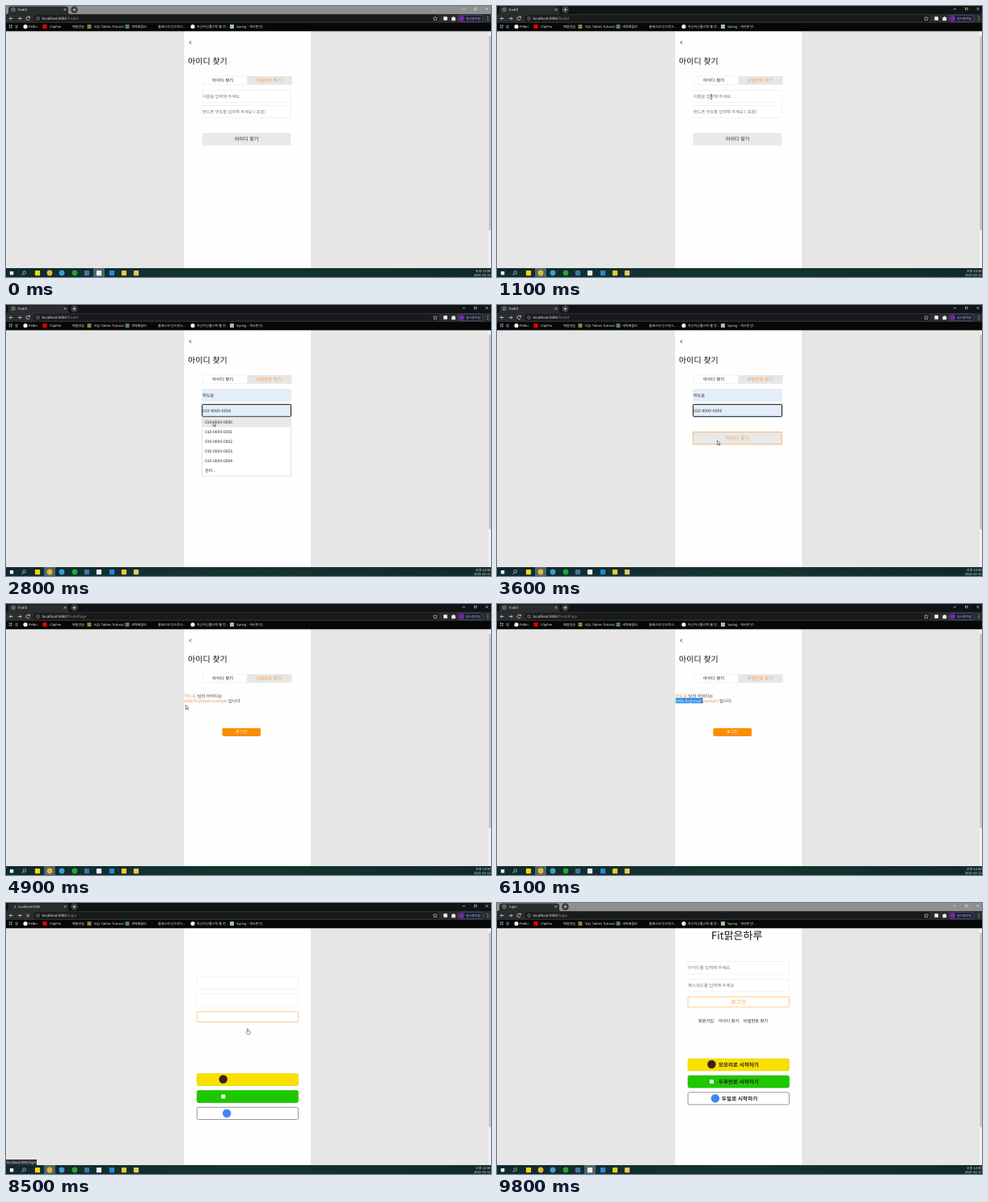
Write an HTML page that moves like this. It is 600 px wide and 336 px high and loops after 9.9 s.

```html
<!DOCTYPE html>
<html lang="ko">
<head>
<meta charset="utf-8">
<title>아이디 찾기</title>
<style>
  html, body { margin: 0; width: 600px; height: 336px; overflow: hidden; background: #e6e6e6; }
  svg { display: block; }
  text {
    font-family: "Noto Sans CJK KR", "Noto Sans CJK JP", "Noto Sans CJK", "Noto Sans", sans-serif;
    text-rendering: geometricPrecision;
    white-space: pre;
  }
</style>
</head>
<body>
<svg id="stage" width="600" height="336" viewBox="0 0 600 336"></svg>
<script>
const LOOP = 9900, STEP = 100;
const ORANGE = '#ff9a3c', INK = '#222', HINT = '#777', FILLED = '#e4eefb', SKY = '#87ceeb';
const PERSON = '하도윤', PHONE = '010-0000-0000', MAIL = 'little.fir@mail.example';

const text = (x, y, s, size, fill = INK, more = '') =>
  `<text x="${x}" y="${y}" font-size="${size}" fill="${fill}" ${more}>${s}</text>`;
const rect = (x, y, w, h, fill, more = '') =>
  `<rect x="${x}" y="${y}" width="${w}" height="${h}" fill="${fill}" ${more}/>`;
const dot = (x, y, r, fill, more = '') => `<circle cx="${x}" cy="${y}" r="${r}" fill="${fill}" ${more}/>`;
const line = (d, color, w = 0.7, more = '') =>
  `<path d="${d}" fill="none" stroke="${color}" stroke-width="${w}" ${more}/>`;
const group = (id, body, more = '') => `<g id="${id}" ${more}>${body}</g>`;
const edge = (color, w = 0.6) => `stroke="${color}" stroke-width="${w}"`;

function browser() {
  const pale = '#e8eaed';
  const marks = [
    [28, 'Pelbri', 24, '#f4f4f4', 'o'], [54, 'ClipFen', 48, '#f00000', 's'], [82, '매일연습'],
    [109, 'SQL Tables Tutorial', 103, '#9a7b3c', 's'], [155, '새싹배움터', 150, '#4c7f78', 's'],
    [188, '클래스와 인스턴스...'], [236, '차근차근풀스택 웹 전...', 231, '#f0f0f0', 'o'],
    [285, 'Spring - 게시판 만...', 279.5, '#9fc39a', 's']
  ].map(([x, s, ix, c, kind]) =>
    (kind === 'o' ? dot(ix, 25.5, 2.6, c) : kind ? rect(ix - 2.5, 23, 5, 5, c) : '') +
    text(x, 27, s, 4.05, pale)).join('');

  return rect(0, 0, 600, 10, '#121314', 'id="strip"') +
    `<path d="M1 10Q3 10 3 7V3Q3 0.5 6 0.5H74Q77 0.5 77 3V7Q77 10 79 10Z" fill="#2b2c2e"/>` +
    group('globe', dot(9, 4.5, 2.4, '#55585b', edge('#8b8e91'))) +
    group('spinner', line('M9 2.1A2.4 2.4 0 0 1 11.4 4.5', '#bdc1c6', 0.8)) +
    text(15, 6, '', 4, pale, 'id="title"') +
    line('M71.7 3.2l2.6 2.6m0-2.6l-2.6 2.6', pale, 0.6) +
    dot(84.5, 4.6, 4.3, '#3a3b3e') + line('M82.6 4.6h3.8m-1.9-1.9v3.8', pale, 0.7) +
    line('M564.5 3.8h3.5M593.3 2l3.2 3.2m0-3.2l-3.2 3.2', pale, 0.6) +
    rect(579.5, 2.3, 2.6, 2.6, 'none', edge(pale, 0.5)) +
    rect(0, 10, 600, 11, '#2b2c2e') + rect(34, 11.2, 502, 8.4, '#191a1c', 'rx="4.2"') +
    line('M8.5 15.5H4.2m2-2l-2 2 2 2', pale) + line('M14.7 15.5H19m-2-2l2 2-2 2', pale) +
    group('reload', line('M29 14.2A2.2 2.2 0 1 0 29.2 16.2M29.4 12.8v1.7h-1.7', pale)) +
    group('stop', line('M25.2 13.6l3.8 3.8m0-3.8l-3.8 3.8', pale)) +
    dot(39.5, 15.5, 2, 'none', edge('#a9adb1', 0.5)) + line('M39.5 15v1.6m0-2.3v.4', '#a9adb1', 0.5) +
    text(44.5, 17.2, '<tspan fill="#f1f3f4">localhost:8080</tspan><tspan id="path"/>', 4.5, '#8d9195') +
    line('M531 13l.8 1.7 1.8.2-1.3 1.2.3 1.8-1.6-.9-1.6.9.3-1.8-1.3-1.2 1.8-.2Z', pale, 0.5) +
    rect(541.3, 13.2, 4.6, 4.6, '#f4f4f4', 'rx=".6"') +
    `<path d="M551.3 14h1.5a.9.9 0 0 1 1.8 0h1.2v1.4a.9.9 0 0 1 0 1.6v1.3h-4.5Z" fill="${pale}"/>` +
    rect(559, 11.3, 31, 8.3, '#1d1d2c', 'rx="4.1" ' + edge('#6b70b5', 0.5)) +
    dot(563.6, 15.5, 3.3, '#7329a5') + text(569, 17, '일시중지됨', 3.9, '#a9c4f5') +
    [13.3, 15.5, 17.7].map(y => dot(596, y, 0.55, pale)).join('') +
    rect(0, 21, 600, 10.3, '#070707') +
    [3.8, 6.1].map(x => [23.4, 25.8].map(y => rect(x, y, 1.5, 1.5, '#8ab4f8')).join('')).join('') +
    text(11, 27, '앱', 4.05, pale) + marks;
}

function taskbar() {
  const icons = [[39, '#f7d800', 's'], [54, '#e5b53a', 'o'], [69, '#3c9fd0', 'o'], [85, '#25a52e', 'o'],
    [100, '#3f789b', 's'], [115, '#eeeeee', 's'], [131, '#2389d4', 's'], [146, '#f6c928', 's'], [161, '#efc65c', 's']];
  return rect(0, 325, 600, 11, 'url(#bar)') +
    rect(0, 325, 14, 11, '#4f6666', 'id="active"') +
    rect(4.8, 329, 4.4, 4.4, '#eef2f3') +
    dot(22.7, 330.5, 1.8, 'none', edge('#eee', 0.6)) + line('M21.4 331.9l-1.9 1.9', '#eee') +
    icons.map(([x, c, k]) => k === 'o' ? dot(x, 331, 3.4, c) : rect(x - 3.1, 328, 6.2, 6.2, c, 'rx=".7"')).join('') +
    text(599.5, 330, '오후 12:30', 4, '#f0f0f0', 'text-anchor="end"') +
    text(599.5, 335, '2021-02-11', 4, '#f0f0f0', 'text-anchor="end"');
}

const finder = () =>
  line('M229.3 43.6l-2.6 1.7 2.6 1.7', INK, 0.7) +
  text(225, 72.2, '아이디 찾기', 10, '#111') +
  rect(243.5, 87, 55, 10.6, '#fff', edge('#ebebeb')) + rect(298.5, 87, 55, 10.6, '#e6e6e6') +
  text(255, 94.1, '아이디 찾기', 5.4) + text(309.7, 94.1, '비밀번호 찾기', 5.4, ORANGE);

const field = (id, y) =>
  rect(242.7, y, 109.8, 15, '#fff', `id="${id}Box"`) + text(243, y + 9.6, '', 5.2, HINT, `id="${id}Text"`);

function list(id, y, items) {
  const h = 12;
  return group(id, rect(242.5, y, 110, items.length * h + 1, '#fff', edge('#c8c8c8', 0.5)) +
    rect(242.8, y + 0.5, 109.4, h, '#e8e8e8', `id="${id}Hover"`) +
    items.map((s, i) => text(246, y + 8.3 + i * h, s, 5)).join(''));
}

const form = () => field('name', 104.3) + field('phone', 123.3) +
  rect(242.7, 157.4, 109.6, 15.4, '#e9e9e9', 'id="findBox"') +
  text(283, 167.4, '아이디 찾기', 6, INK, 'id="findText"') +
  list('nameList', 120, [PERSON, '관리...']) +
  list('phoneList', 139, [PHONE, ...[1, 2, 3, 4].map(n => '010-0000-000' + n), '관리...']);

const result = () =>
  text(220.5, 115.6, `<tspan fill="#f0905a">${PERSON}</tspan> 님의 아이디는`, 5.3, '#333') +
  text(220.7, 121.8, MAIL, 5, '#f0905a') + text(275, 121.8, '입니다', 5.25, '#333') +
  `<g clip-path="url(#picked)">${rect(220.5, 116.5, 54, 6.6, '#2f8ae6')}${text(220.7, 121.8, MAIL, 5, '#fff')}</g>` +
  rect(267.7, 154, 47.2, 9.8, '#d97400', 'rx="1.6"') + rect(267.7, 154, 47.2, 9, '#ff8c00', 'rx="1.6"') +
  text(284, 160.3, '로그인', 5.2, '#fff');

function login() {
  const box = (y, h, fill, stroke, more = '') => rect(236.2, y, 125.3, h, fill, edge(stroke) + more);
  return box(72.5, 15.5, '#fff', '#ececec') + box(94.3, 15.5, '#fff', '#ececec') +
    box(116.3, 12.6, '#fff', '#ffac4d', ' rx=".8"') +
    box(193, 15, '#f9e000', '#e8d100', ' rx="2"') + box(214, 15, '#1ec800', '#19b300', ' rx="2"') +
    box(234.8, 15.2, '#fff', '#555', ' rx="2"') +
    group('badges', dot(265.5, 200, 5.2, '#3a2020') + rect(263.2, 219, 4.8, 4.8, '#fff') +
      dot(270, 242.3, 5.2, '#4285f4')) +
    group('words', text(265, 45.2, 'Fit맑은하루', 13, '#111', 'font-weight="500"') +
      text(236.3, 82, '아이디를 입력해 주세요.', 5.3, HINT) +
      text(236.3, 103.8, '패스워드를 입력해 주세요', 5.35, HINT) +
      text(289.6, 125, '로그인', 6.7, ORANGE) +
      text(249, 147.8, '회원가입', 5.2) + text(274, 147.8, '아이디 찾기', 5.2) + text(305, 147.8, '비밀번호 찾기', 5.2) +
      text(274, 203, '모모리로 시작하기', 6.5, '#222', 'font-weight="700"') +
      text(274, 224, '두루빈로 시작하기', 6.5, '#222', 'font-weight="700"') +
      text(278, 245, '두빌로 시작하기', 6.6, '#222', 'font-weight="700"'));
}

const cursors = () =>
  group('arrow', '<path d="M0 0V5.3L1.2 4.2 2.1 6.1 3 5.7 2.1 3.9H3.8Z" fill="#fff" stroke="#111" stroke-width=".5"/>') +
  group('beam', line('M-1.2-2.8H1.2M0-2.8V2.8M-1.2 2.8H1.2', '#333', 0.6)) +
  group('hand', '<path d="M0 0Q.8-.5 1 .3V2.4Q3.9 2.5 3.9 3.8V5L3.2 6.8H.2L-1.6 4Q-1.4 3-.2 4Z" fill="#fff" stroke="#222" stroke-width=".5"/>');

document.getElementById('stage').innerHTML =
  `<defs><linearGradient id="bar"><stop stop-color="#0f2930"/><stop offset=".5" stop-color="#14352f"/>
  <stop offset="1" stop-color="#0f292b"/></linearGradient>
  <clipPath id="picked"><rect id="pick" x="220.5" y="116" height="8" width="0"/></clipPath></defs>` +
  rect(0, 31, 600, 294, '#e6e6e6') + rect(220.3, 31, 156.8, 294, '#fefefe') +
  rect(597, 31, 3, 294, '#f1f1f1') + rect(597.6, 37, 2, 241, '#b9b9b9') +
  group('finder', finder() + group('form', form()) + group('result', result())) +
  group('login', login()) + browser() +
  group('status', rect(0, 318, 38, 7, '#2f3235') + text(1, 323.2, 'localhost:8080/login', 3.9, '#d5d8db')) +
  taskbar() + cursors();

const el = {};
document.querySelectorAll('[id]').forEach(e => { el[e.id] = e; });
const show = (id, on) => el[id].setAttribute('display', on ? 'inline' : 'none');
const set = (id, attrs) => Object.entries(attrs).forEach(([k, v]) => el[id].setAttribute(k, v));

// time, x, y of the pointer
const route = [[400, 330, 324], [1000, 268, 113], [1200, 262, 112], [1500, 262, 112], [1700, 262, 126],
  [2000, 262, 126], [2200, 254, 129.5], [2500, 254, 129.5], [2700, 256, 145], [3200, 256, 145],
  [3600, 272.5, 168], [3900, 279, 167], [4500, 279, 167], [4900, 222.3, 125.2], [5300, 221, 119.6],
  [5400, 221, 119.6], [6400, 268, 119.6], [7000, 274, 119.6], [7100, 274, 119.6], [7400, 296.3, 169],
  [7500, 296.3, 169], [8000, 298.4, 156], [8600, 298.4, 156], [9100, 449, 337]];

function along(t) {
  const i = route.findIndex(k => k[0] > t);
  if (i < 0) return route[route.length - 1].slice(1);
  if (!i) return route[0].slice(1);
  const [a, b] = [route[i - 1], route[i]], p = (t - a[0]) / (b[0] - a[0]);
  return [a[1] + (b[1] - a[1]) * p, a[2] + (b[2] - a[2]) * p];
}

function fill(id, value, hint, focused) {
  el[id + 'Text'].textContent = value || hint;
  set(id + 'Text', { fill: value ? INK : HINT });
  set(id + 'Box', {
    fill: value ? FILLED : focused ? SKY : '#fff',
    stroke: focused ? '#111' : '#ececec', 'stroke-width': focused ? 1 : 0.6, rx: focused ? 0.8 : 0
  });
}

function draw(time) {
  const t = Math.floor(time / STEP) * STEP;
  const within = (a, b) => t >= a && t < b;
  const awake = within(400, 9800), loading = within(3900, 4600) || within(8200, 8700);
  const atLogin = t >= 8400, ready = t >= 8700;

  set('strip', { fill: awake ? '#121314' : '#8f8f8f' });
  set('active', { x: awake ? 47 : 108 });
  el.title.textContent = ready ? 'login' : atLogin ? 'localhost:8080' : 'findID';
  el.path.textContent = atLogin ? '/login' : t >= 4600 ? '/findIdPage' : '/findId';
  show('globe', !loading);
  show('spinner', loading);
  show('reload', !loading);
  show('stop', loading);
  set('spinner', { transform: `rotate(${(Math.min(t, t < 4600 ? 4200 : t) * 0.45 + 180) % 360} 9 4.5)` });

  show('finder', !atLogin);
  show('form', t < 4600);
  show('result', t >= 4600);
  show('login', atLogin);
  show('words', ready);
  set('login', { transform: `translate(0 ${ready ? 0 : 18.5})` });
  set('badges', { transform: `translate(${ready ? 0 : 3.2} 0)` });
  show('status', within(7700, 9000));

  fill('name', t >= 1800 ? PERSON : '', '이름을 입력해 주세요.', within(1200, 2200));
  fill('phone', t >= 2700 ? PHONE : '', '핸드폰 번호를 입력해 주세요.(-포함)', within(2200, 3900));
  show('nameList', within(1500, 2000));
  show('nameListHover', t >= 1700);
  show('phoneList', within(2300, 3100));
  show('phoneListHover', t >= 2700);
  const over = within(3500, 4600);
  set('findBox', { stroke: over ? '#ffab57' : 'none', 'stroke-width': 0.8 });
  set('findText', { fill: over ? ORANGE : INK });

  const [x, y] = along(t);
  set('pick', { width: t < 5500 ? 0 : Math.min(53.5, Math.max(0, x - 220.5)) });
  const kind = !within(400, 9100) ? '' :
    within(1000, 1600) || within(2100, 2600) || within(5200, 7200) ? 'beam' :
    within(7700, 8800) ? 'hand' : 'arrow';
  for (const id of ['arrow', 'beam', 'hand']) {
    show(id, id === kind);
    set(id, { transform: `translate(${x} ${y})` });
  }
}

const start = performance.now();
function tick() {
  draw((performance.now() - start) % LOOP);
  requestAnimationFrame(tick);
}
tick();
</script>
</body>
</html>
```
